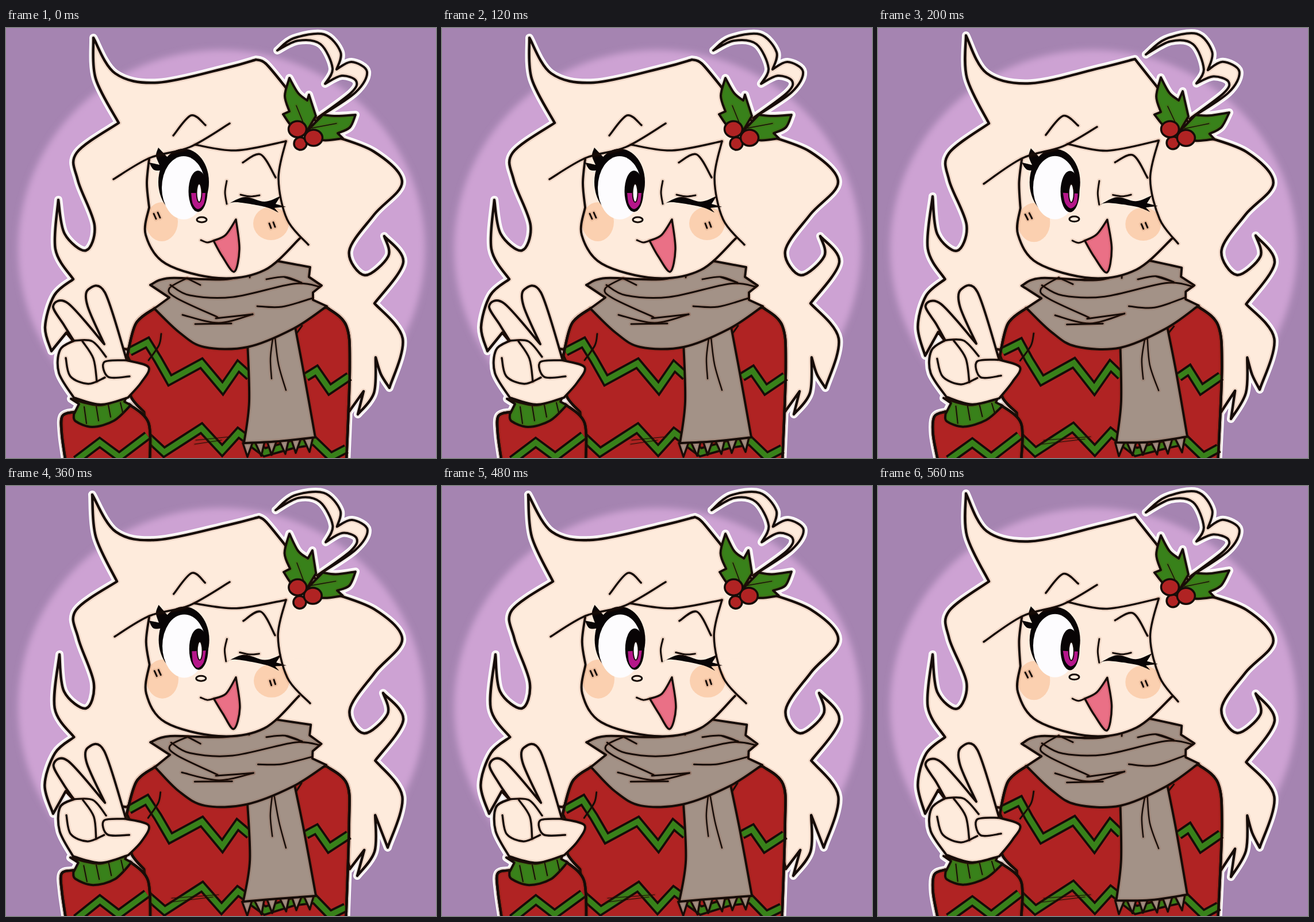
An HTML page for the animation above (720 ms loop, 748 px wide and 748 px high).

```html
<!DOCTYPE html>
<html>
<head>
<meta charset="utf-8">
<style>
html, body { margin: 0; width: 100%; height: 100%; overflow: hidden; background: #a584b1; }
svg { display: block; width: 100vw; height: 100vh; }
path, ellipse { stroke-linecap: round; stroke-linejoin: round; }
.flat path { stroke-linecap: butt; stroke-linejoin: miter; }
</style>
</head>
<body>
<svg viewBox="0 0 748 748">
  <filter id="soft"><feGaussianBlur stdDeviation="6"/></filter>
  <rect width="748" height="748" fill="#a584b1"/>
  <ellipse cx="375" cy="384" rx="354" ry="346" fill="#cda2d3" filter="url(#soft)"/>
  <g id="stage"></g>
</svg>
<script>
const SKIN = '#feebdc', RED = '#b02323', GREEN = '#38811a', GREY = '#a39287', INK = '#160c08', BLACK = '#080405';
let pose = 0;

// Line boil: each redrawn pose bends the drawing along smooth waves.
function boil([x, y]) {
  const size = pose ? 1.3 : 0;
  return [x + size * Math.sin(x / 31 + y / 23 + pose * 2), y + size * Math.sin(x / 27 - y / 19 + pose * 3)];
}

// A tip that jumps lists its places: "x,y|x,y|x,y".
function point(text) {
  const places = text.split('|').map(p => p.split(',').map(Number));
  return places.length > 1 ? places[pose] : boil(places[0]);
}

// Smooth curve through the points; "/" makes a corner.
function curve(text) {
  let d = '', last;
  for (const part of text.split('/')) {
    const p = part.trim().split(/\s+/).map(point);
    if (last) p.unshift(last);
    else d = 'M' + p[0];
    for (let i = 0; i < p.length - 1; i++) {
      const a = p[i], b = p[i + 1], before = p[i - 1] || a, after = p[i + 2] || b;
      const c1 = a.map((v, k) => v + (b[k] - before[k]) / 6);
      const c2 = b.map((v, k) => v - (after[k] - a[k]) / 6);
      d += `C${c1} ${c2} ${b}`;
    }
    last = p[p.length - 1];
  }
  return d;
}

const path = (text, fill, stroke = 'none', w = 0, more = '') =>
  `<path d="${curve(text)}" fill="${fill}" stroke="${stroke}" stroke-width="${w}" ${more}/>`;
const shape = (text, fill = 'none', w = 4) =>
  path(text, fill, '#6b2408', w + 5, 'stroke-opacity=".1"') + path(text, 'none', INK, w);
const lines = (w, ...all) => all.map(t => shape(t, 'none', w)).join('');
function oval(x, y, rx, ry, fill, w = 0) {
  const [cx, cy] = boil([x, y]);
  return `<ellipse cx="${cx}" cy="${cy}" rx="${rx}" ry="${ry}" fill="${fill}" stroke="${INK}" stroke-width="${w}"/>`;
}
const band = text => '<g class="flat">' + path(text.replaceAll(' ', ' / '), 'none', INK, 17) +
  path(text.replaceAll(' ', ' / '), 'none', GREEN, 9.5) + '</g>';
const repeat = (n, make) => Array.from({ length: n }, (_, i) => make(i)).join('');

const hair = `120,548 105,530 / 79,562|82,570|82,570 / 68,520 84,465 117,437 / 86,385 91,299|95,293|93,293 /
  102,358 139,387 154,343 125,265 123,217 196,165|193,166|193,166 / 156,88 152,17|153,13|150,15 /
  190,79 264,95 385,69 435,55|447,54|440,54 / 452,62 488,105 / 560,185 / 640,215 689,268 640,325 597,388 624,430 665,397
  658,362|657,361|656,360 / 691,408 641,479 / 690,540 667,626|664,629|664,629 / 652,602 643,573 /
  640,635 612,672|614,680|611,678 / 622,632 / 597,667 / 560,530 / 220,560 / 120,548`;
const curl = `472,39|466,46|469,42 / 500,18 553,11 582,42 575,72 / 601,59 628,76 608,112 541,157 /
  600,113 609,92 584,83 555,97 / 568,70 547,28 508,22 472,39|466,46|469,42`;
const leaves = [
  `493,87|492,86|493,83 / 508,113 524,126 / 527,116|530,110|533,112 / 539,153 / 523,180 / 500,174 482,150 /
   493,145 / 485,118 493,87|492,86|493,83`,
  '523,180 / 551,151 / 575,153 608,151|611,147|608,149 / 598,173 577,183 / 586,192 / 550,195 523,180'
];
const body = '258,488 226,514 211,570 / 226,610 217,640 240,668 / 250,756 / 592,756 / 598,590 592,518 558,486 / 258,488';
const sleeve = '118,668 / 98,675 97,706 104,756 / 250,756 / 248,687 215,655';
const cuff = '113,645 / 127,654 / 118,672 / 121,684 150,694 188,683 217,656 / 206,650 / 212,636 / 165,656 113,645';
const hand = `118,643 92,600 94,560 118,544 / 101,517 82,484 108,479 171,550 / 142,484 143,455 172,460 210,578 /
  248,590 235,617 212,643 / 165,655 118,643`;
const tail = '420,545 423,650 414,722 / 475,719 538,712 / 518,600 502,515';
const scarf = `251,447 285,435 390,436 470,405 / 529,416 / 527,433 / 549,448 / 534,460 / 534,473 / 558,484 /
  500,523 420,555 345,555 302,530 258,488 / 284,469 / 251,447`;
const face = '249,228 245,270 249,312 / 243,360 278,410 370,435 450,421 511,366';

// Grey strips at the end of the scarf, each leaning a little.
const fringe = () => repeat(6, i => {
  const x = 412 + i * 21, y = 722 - i * 1.7, tip = x + 8 + i % 2 * 3;
  return shape(`${x},${y} / ${tip},${y + 24} / ${x + 17},${y - 1}`, GREY, 3.5);
});

const ribs = () => repeat(4, i => {
  const x = 136 + i * 21, y = 659 - i * i * .8;
  return lines(2, `${x},${y} ${x + 4},${y + 29 - i * 4}`);
});

function eyes() {
  return oval(309, 268, 44, 58, BLACK) + oval(309, 278, 38, 55, '#fdfcfe') +
    path('276,247 258,247 249,234 / 267,238 / 261,222 265,208 / 284,228 / 276,247', BLACK) +
    oval(334, 284, 16.5, 36, BLACK) +
    path('322,287 / 325,306 334,315 344,306 347,287 / 322,287', '#b5168a') +
    oval(336, 287, 4.5, 16, '#fdfcfe', 2) +
    path(`383,308 415,294 450,302 478,292 / 469,306 / 487,311 / 467,313 / 474,321 / 450,311 400,303 383,308`, BLACK);
}

function head() {
  return path(face, SKIN) + oval(271, 337, 28, 34, '#fbd0b0') + oval(461, 340, 31, 29, '#fbd0b0') +
    path('481,300 503,357 / 530,360 / 520,300 / 481,300', SKIN) +
    shape(face) + eyes() +
    lines(3, '257,323 261,332', '264,321 268,330', '458,340 461,348', '465,338 468,346',
      '384,266 381,286 384,306', '408,290 425,293 441,291', '339,369 350,373 361,370') +
    oval(340.5, 333.5, 8.5, 4.5, SKIN, 3) +
    shape('361,370 382,360 400,333 / 406,385 397,424 376,397 361,370', '#ea7086', 3.5) +
    lines(3.5, '291,187 322,152 347,169', '412,234 443,220 469,260',
      '187,263|184,271|189,262 250,226 320,207 389,166|381,172|389,167', '329,203 400,213 487,197',
      '487,197 474,262 489,333 526,377|522,375|529,378');
}

function sweater() {
  return shape(body, RED, 4.5) +
    band('215,563 246,547 264,576 285,613 340,583 377,627 404,588 424,606') +
    band('522,607 540,596 563,629 597,606') +
    band('246,711 275,738 340,696 376,735 404,704 450,738 500,724 536,718 565,746 592,732') +
    shape(body, 'none', 4.5) +
    lines(3, '270,532 266,552 248,578', '505,532 515,518') +
    lines(1.2, '330,717|288,717|288,717 390,711|370,711|370,711', '328,724|285,724|285,724 375,717|360,715|360,715');
}

function wrap() {
  return fringe() + shape(tail, GREY) +
    lines(2.5, '464,540 460,575 462,610', '468,538 474,585 487,630') + shape(scarf, GREY) +
    lines(3, '315,435 284,453 297,470 368,503', '286,447 320,465 395,468 500,445 546,450', '316,436 338,447',
      '453,437 485,433 514,443 / 484,433', '307,499 370,513 429,498', '329,515 392,514', '365,505 429,498',
      '437,484 480,485 533,470', '424,427 424,434');
}

function arm() {
  return shape(sleeve, RED, 4.5) + band('122,752 163,721 197,746 246,709') + shape(sleeve, 'none', 4.5) +
    shape(cuff, GREEN) + ribs() + shape(hand, SKIN) +
    lines(3.5, '118,544 150,545 174,572', '104,574 112,606 143,619 172,608', '133,545 152,575 158,615',
      '210,578 171,581 178,607 215,606');
}

function holly() {
  return leaves.map(t => shape(t, GREEN)).join('') +
    lines(1.5, '505,135 520,172', '575,166 532,174') +
    oval(512, 201, 11, 11, RED, 3.5) + oval(535, 191, 15.5, 14, RED, 3.5) + oval(507, 176, 15.5, 14, RED, 3.5);
}

function figure() {
  const halo = [hair, curl, ...leaves, body, sleeve, cuff, hand].map(t => path(t, '#fff', '#fff', 14)).join('');
  return halo + shape(curl, SKIN) + shape(hair, SKIN, 4.5) + sweater() + wrap() + arm() + head() + holly();
}

const stage = document.getElementById('stage');
stage.innerHTML = repeat(3, i => {
  pose = i;
  return `<g visibility="hidden">${figure()}</g>`;
});

function tick() {
  const t = performance.now() % 720;
  const now = t < 200 ? 0 : t < 360 ? 1 : t < 560 ? 2 : 1;
  [...stage.children].forEach((g, i) => g.setAttribute('visibility', i === now ? 'visible' : 'hidden'));
  requestAnimationFrame(tick);
}
tick();
</script>
</body>
</html>
```
